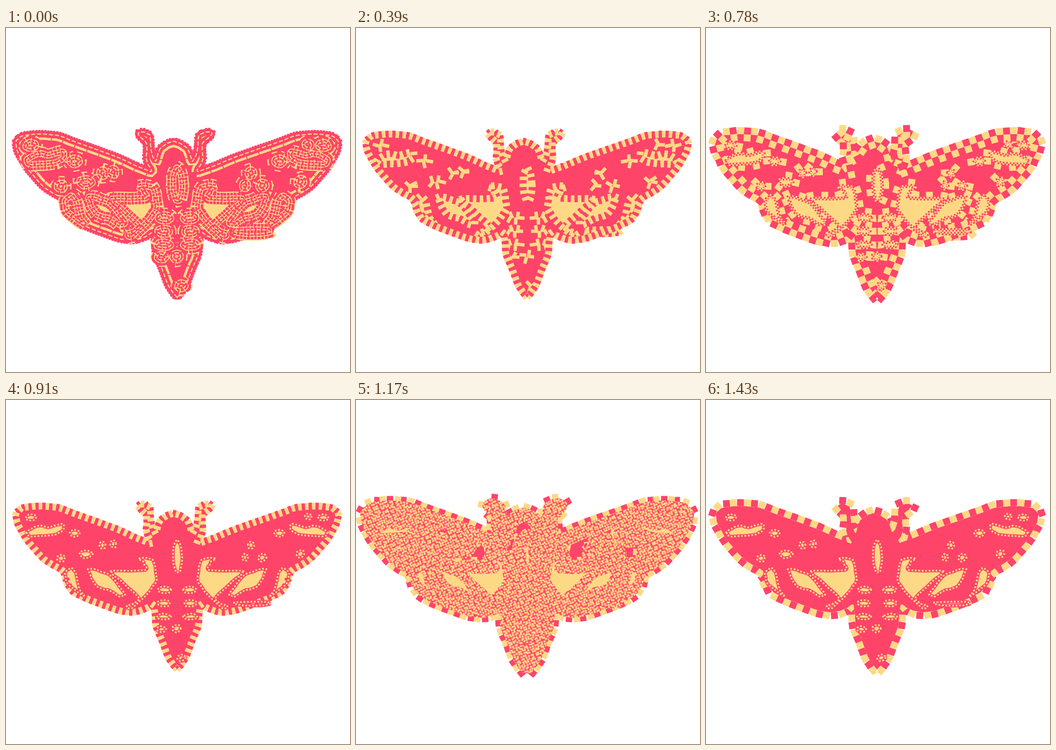
An HTML page that plays this animation: 748 px wide and 748 px high, repeating every 1560 ms.

```html
<!DOCTYPE html>
<html lang="en">
<head>
<meta charset="utf-8">
<title>Moth</title>
<style>
html, body { margin: 0; width: 100%; height: 100%; overflow: hidden; background: #fff; }
svg { display: block; width: 100vw; height: 100vh; }
</style>
</head>
<body>
<svg id="stage" viewBox="0 0 748 748"></svg>
<script>
const RED = '#ff4469', YELLOW = '#fdd985';
const STEP = 130, LOOP = 1560, AXIS = 372, DETAIL = 8;

const points = text => text.split('  ').map(pair => pair.split(' ').map(Number));

function random(seed) {
  return () => (seed = seed * 16807 % 2147483647) / 2147483647;
}
const rnd = random(77);

// Left half of the silhouette, from the tail up to the head
const half = points('372 586  354 562  337 518  326 492  321 446  300 455  280 461  250 459  195 440  150 420  ' +
  '133 400  124 372  85 348  50 310  28 275  21 250  32 236  60 231  110 233  160 251  240 280  314 312  ' +
  '305 285  306 252  288 232  292 226  312 232  316 268  325 290  334 264  348 252  364 246');
const WING_TOP = 17;

const wingSpot = points('44 288  62 276  78 273  92 277  122 269  126 279  110 292  56 297');
const hindSpots = [
  points('128 378  140 365  151 374  160 412  172 428  136 402'),
  points('178 368  222 378  258 420  248 428  225 414  198 406'),
  points('228 372  302 370  299 352  288 345  318 346  328 388  314 414  275 452  262 448  290 433  250 393')
];

// The mirror line leans a little to the left at the head
function mirror([x, y]) {
  const lean = 8 * Math.exp(-(((AXIS - x) / 110) ** 2)) / (1 + Math.exp((y - 325) / 4));
  return [2 * (AXIS - lean) - x, y];
}

function blob(x, y, rx, ry) {
  return Array.from({ length: 7 }, (_, i) => {
    const a = i / 7 * 2 * Math.PI, r = 0.85 + rnd() * 0.3;
    return [x + rx * r * Math.cos(a), y + ry * r * Math.sin(a)];
  });
}

// Catmull-Rom curve as a polyline with running lengths
function strand(keys, { closed = true, side = 1, anchor = 0 } = {}) {
  const n = keys.length, pts = [];
  const at = i => keys[closed ? (i + n) % n : Math.min(n - 1, Math.max(0, i))];
  for (let i = 0; i < (closed ? n : n - 1); i++) {
    for (let j = 0; j < DETAIL; j++) {
      const t = j / DETAIL, [a, b, c, d] = [-1, 0, 1, 2].map(k => at(i + k));
      pts.push([0, 1].map(m => b[m] + 0.4 * t * (c[m] - a[m]) +
        t * t * (0.8 * a[m] - 2.2 * b[m] + 1.8 * c[m] - 0.4 * d[m]) +
        t * t * t * (-0.4 * a[m] + 1.6 * b[m] - 1.6 * c[m] + 0.4 * d[m])));
    }
  }
  pts.push(at(closed ? 0 : n - 1));
  const lens = [0];
  for (let i = 1; i < pts.length; i++) {
    lens.push(lens[i - 1] + Math.hypot(pts[i][0] - pts[i - 1][0], pts[i][1] - pts[i - 1][1]));
  }
  return { pts, lens, side, anchor: lens[anchor * DETAIL] };
}
const pair = keys => [strand(keys), strand(keys.map(mirror), { side: -1 })];

const bodySides = [1, -1].map(side =>
  strand(side > 0 ? half : half.map(mirror), { closed: false, side, anchor: WING_TOP }));

const small = [
  ...pair(wingSpot),
  ...[[54, 256, 13, 7], [150, 290, 11, 7], [210, 315, 7, 8]].flatMap(b => pair(blob(...b))),
  ...[[173, 335, 14, 9], [233, 313, 7, 8], [119, 344, 9, 8], [640, 335, 8, 9],
    [557, 343, 9, 8], [520, 343, 6, 8], [657, 254, 7, 6],
    [373, 342, 10, 36], [338, 498, 9, 7], [371, 497, 8, 8], [381, 561, 9, 7]].map(b => strand(blob(...b)))
];
for (let i = 0; i < 3; i++) small.push(...pair(blob(AXIS - 29, 413 + 29 * i, 15, 7)));
const hind = [...hindSpots.flatMap(pair), strand(blob(538, 443, 42, 5))];

const strands = { body: bodySides, small, hind, spots: [...small, ...hind] };

const path = pts => 'M' + pts.map(p => p.map(v => v.toFixed(1)).join(' ')).join('L') + 'Z';
const outlines = {};
for (const [id, list] of Object.entries(strands)) outlines[id] = list.map(s => path(s.pts)).join('');
outlines.body = path([...bodySides[0].pts, ...bodySides[1].pts.slice().reverse()]);

// Straight blocks set along a shape, reaching from one offset to another across its edge
function tiles(shape, color, step, from, to, keep = () => true, length = step) {
  let d = '';
  for (const { pts, lens, side, anchor } of strands[shape]) {
    const total = lens[lens.length - 1];
    let seg = 1;
    for (let k = Math.ceil(-anchor / step); anchor + k * step < total; k++) {
      if (!keep(k)) continue;
      const s = anchor + k * step;
      while (seg < pts.length - 1 && lens[seg] < s) seg++;
      const [ax, ay] = pts[seg - 1], [bx, by] = pts[seg], span = lens[seg] - lens[seg - 1];
      const tx = (bx - ax) / span, ty = (by - ay) / span, f = s - lens[seg - 1];
      const corner = (along, out) => [
        ax + tx * (f + along) + side * ty * out,
        ay + ty * (f + along) - side * tx * out];
      const h = length / 2;
      d += path([corner(-h, from), corner(h, from), corner(h, to), corner(-h, to)]);
    }
  }
  return `<path d="${d}" fill="${color}"/>`;
}
const even = k => k % 2 === 0, odd = k => !even(k);

function speckle() {
  const cells = 40, side = 3.9, size = cells * side;
  let d = '';
  for (let i = 0; i < cells * cells; i++) {
    const col = i % cells, row = Math.floor(i / cells);
    if ((col + row) % 2) continue;
    const x = (col + 0.8 * rnd()) * side, y = (row + 0.8 * rnd()) * side, turn = rnd() * 1.6;
    const square = (cx, cy) => path([0, 1, 2, 3].map(q => {
      const a = turn + q * Math.PI / 2;
      return [cx + 3 * Math.cos(a), cy + 3 * Math.sin(a)];
    }));
    for (const dx of [0, size]) for (const dy of [0, size]) {
      if (x - dx > -4 && y - dy > -4) d += square(x - dx, y - dy);
    }
  }
  return `<pattern id="grain" width="${size}" height="${size}" patternUnits="userSpaceOnUse" patternTransform="rotate(20)">
    <rect width="${size}" height="${size}" fill="${RED}"/><path d="${d}" fill="${YELLOW}"/></pattern>`;
}

const fill = (shape, color) => `<use href="#${shape}" fill="${color}"/>`;
const line = (shape, color, width, dash = 'none') =>
  `<use href="#${shape}" fill="none" stroke="${color}" stroke-width="${width}" stroke-dasharray="${dash}"/>`;
const inside = (shape, content) => `<g clip-path="url(#in-${shape})">${content}</g>`;

const base = () => fill('body', RED) + fill('spots', YELLOW);
const row = (shape, step, from, to, first = YELLOW, second = RED) =>
  tiles(shape, second, step, from, to, odd) + tiles(shape, first, step, from, to, even);
const stripes = (shape, width) => row(shape, width / 2, -width / 2, width / 2);
const dots = (shape, width) =>
  line(shape, RED, width) + tiles(shape, YELLOW, width / 2, -width / 4, width / 4, even);
const checks = (shape, width) =>
  row(shape, width / 2, -width / 2, 0) + row(shape, width / 2, 0, width / 2, RED, YELLOW);
const squares = size => row('body', size, 0, size) + fill('body', RED);

function ticks() {
  return base() + inside('body', line('body', YELLOW, 25, '26 2')) +
    tiles('body', RED, 6.3, -7, 9, undefined, 5) + line('body', RED, 14) + line('body', YELLOW, 2.5, '9 4') +
    tiles('spots', YELLOW, 13, -14, 15) + line('spots', RED, 25, '6 1.4') +
    line('spots', YELLOW, 14, '14 2') + line('spots', RED, 10, '6 1.4') + line('spots', YELLOW, 2.4, '8 4');
}

function blocks() {
  return fill('body', RED) + stripes('body', 7.5) +
    tiles('small', YELLOW, 30, 0, 11, undefined, 22) + fill('small', RED) +
    tiles('hind', YELLOW, 22.5, 0, 11, undefined, 22) + fill('hind', YELLOW) +
    tiles('hind', RED, 25, -10, 0);
}

function grains(size) {
  return row('body', size, -22, 22) + fill('body', RED) +
    inside('body', row('spots', size, 0, 30) + line('body', 'url(#grain)', 40)) +
    line('body', 'url(#grain)', 24) + inside('body', line('spots', 'url(#grain)', 48)) +
    fill('spots', YELLOW) + line('spots', 'url(#grain)', 14);
}

const mosaic = size => fill('body', RED) + row('spots', size, 0, size) + checks('body', 2 * size) +
  fill('spots', YELLOW) + checks('spots', 7.5);

const poses = [
  ticks(),
  blocks(),
  squares(18) + fill('spots', YELLOW) + stripes('spots', 15),
  base() + stripes('spots', 15) + stripes('body', 15),
  base() + stripes('body', 7.5) + dots('spots', 15),
  mosaic(18),
  mosaic(15),
  base() + stripes('body', 15) + dots('spots', 7.5),
  base() + dots('spots', 15) + stripes('body', 15),
  grains(14),
  grains(17),
  squares(15) + fill('spots', YELLOW) + dots('spots', 7.5)
];

const stage = document.getElementById('stage');
const defs = Object.entries(outlines).map(([id, d]) =>
  `<path id="${id}" d="${d}"/><clipPath id="in-${id}"><path d="${d}"/></clipPath>`).join('');
stage.innerHTML = `<defs>${defs}${speckle()}</defs>` +
  poses.map(p => `<g class="pose" stroke-linejoin="bevel" visibility="hidden">${p}</g>`).join('');
const groups = [...stage.querySelectorAll('.pose')];

let shown = -1;
function draw(time) {
  const index = Math.floor(time % LOOP / STEP);
  if (index === shown) return;
  shown = index;
  groups.forEach((g, i) => g.setAttribute('visibility', i === index ? 'visible' : 'hidden'));
}

const start = performance.now();
function tick() {
  draw(performance.now() - start);
  requestAnimationFrame(tick);
}
draw(0);
requestAnimationFrame(tick);
</script>
</body>
</html>
```
